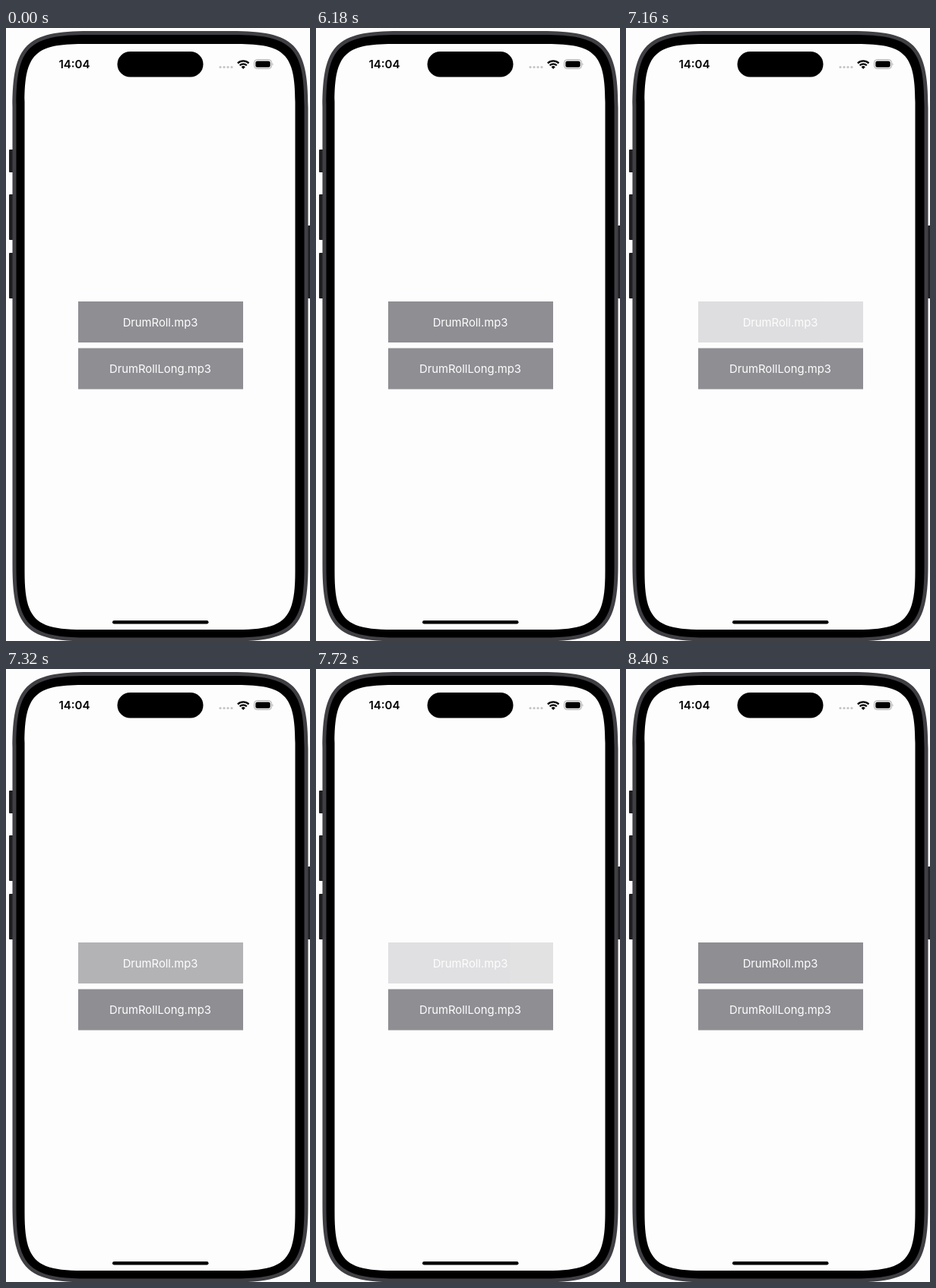
Write an HTML page that moves like this. It is 400 px wide and 807 px high and loops after 8.5 s.

```html
<!DOCTYPE html>
<html lang="en">
<head>
<meta charset="utf-8">
<title>Drum roll player</title>
<style>
  html, body { margin: 0; width: 100%; height: 100%; overflow: hidden; background: #fdfdfd; }
  svg { display: block; width: 400px; height: 807px; }
  text { font-family: Inter, "Liberation Sans", sans-serif; text-anchor: middle; }
  .button rect { fill: #8e8e93; }
  .button text { font-size: 14.8px; fill: #fff; }
  .clock { font-size: 15px; font-weight: 600; }
</style>
</head>
<body>
<svg viewBox="0 0 400 807">
  <g fill="#1f1f22">
    <rect x="4" y="160" width="6" height="30" rx="1"/>
    <rect x="4" y="219" width="6" height="60" rx="1"/>
    <rect x="4" y="296" width="6" height="60" rx="1"/>
    <rect x="397" y="260" width="4" height="96" rx="1"/>
  </g>
  <path id="rim" fill="#3f3f44"/>
  <path id="bezel" fill="#000"/>
  <path id="screen" fill="#fdfdfd"/>
  <rect x="146.5" y="31" width="113" height="33.5" rx="16.75"/>
  <rect x="140" y="780" width="126.5" height="4.5" rx="2.25"/>

  <text class="clock" x="90" y="53">14:04</text>
  <path d="M282 51.5h16" stroke="#c4c4c6" stroke-width="3.2" stroke-linecap="round" stroke-dasharray="0 5"/>
  <g fill="none" stroke="#000" stroke-width="2.3">
    <path d="M304.9 46.4A10.4 10.4 0 0 1 319.5 46.4"/>
    <path d="M307.6 49.3A6.5 6.5 0 0 1 316.8 49.3"/>
  </g>
  <path d="M309.6 51.2A3.8 3.8 0 0 1 314.8 51.2L312.2 54Z"/>
  <rect x="326.6" y="41.7" width="22.8" height="11.8" rx="3.7" fill="none" stroke="#a6a6a8"/>
  <rect x="328.3" y="43.4" width="19.4" height="8.4" rx="2.3"/>
  <path d="M350.6 45.6q1.6 2 0 4z" fill="#a6a6a8"/>

  <g class="button" id="short">
    <rect x="95" y="360" width="217" height="54"/>
    <text x="203" y="392.5">DrumRoll.mp3</text>
  </g>
  <g class="button" id="long">
    <rect x="95" y="421.5" width="217" height="54"/>
    <text x="203" y="454">DrumRollLong.mp3</text>
  </g>
</svg>
<script>
const LOOP = 8500, FADE_IN = 150, FADE_OUT = 250, DIM = .2;
const $ = id => document.getElementById(id);

// Rectangle with smooth, continuous corners of nominal radius r
function smoothRect(x, y, w, h, r) {
  const e = 1.528 * r, c = .272 * r;
  return `M${x + e} ${y}h${w - 2 * e}c${e - c} 0 ${e} ${c} ${e} ${e}` +
    `v${h - 2 * e}c0 ${e - c} ${-c} ${e} ${-e} ${e}` +
    `h${2 * e - w}c${c - e} 0 ${-e} ${-c} ${-e} ${-e}` +
    `v${2 * e - h}c0 ${c - e} ${c} ${-e} ${e} ${-e}z`;
}
$("rim").setAttribute("d", smoothRect(8.5, 4, 389, 803.5, 66));
$("bezel").setAttribute("d", smoothRect(13.5, 9, 379, 793.5, 61));
$("screen").setAttribute("d", smoothRect(24.5, 21, 356, 771, 50));

// Finger down and up times in ms
const taps = {
  long: [[20, 190]],
  short: [[6180, 350 + 6000], [6900, 7108], [7270, 7413], [7600, 7785], [7985, 8150]]
};

const easeInOut = k => k < .5 ? 2 * k * k : 1 - 2 * (1 - k) ** 2;
const fade = (from, to, ms, span) => from + (to - from) * easeInOut(Math.min(1, ms / span));

// Each fade starts from wherever the previous one was interrupted
function opacityAt(list, t) {
  let value = 1, since = 0, target = 1, span = FADE_OUT;
  const turn = (at, to, ms) => {
    value = fade(value, target, at - since, span);
    [since, target, span] = [at, to, ms];
  };
  for (const [down, up] of list) {
    if (t >= down) turn(down, DIM, FADE_IN);
    if (t >= up) turn(up, 1, FADE_OUT);
  }
  return fade(value, target, t - since, span);
}

const start = performance.now();
function tick() {
  const t = (performance.now() - start) % LOOP;
  for (const id in taps) $(id).setAttribute("opacity", opacityAt(taps[id], t));
  requestAnimationFrame(tick);
}
tick();
</script>
</body>
</html>
```
